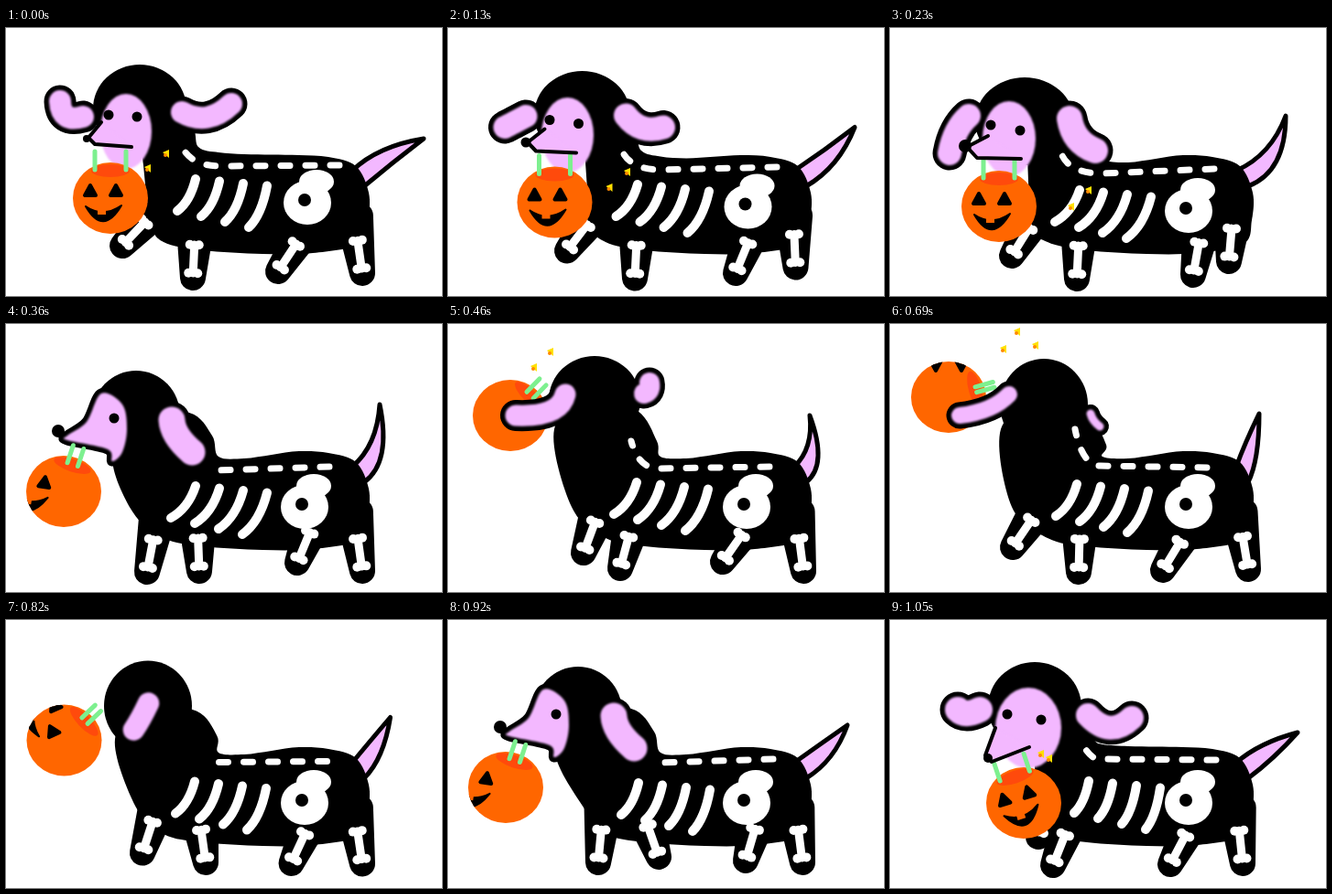
Animation of 476 by 293 pixels, one loop 1.15 s. Source, as an HTML page with a canvas:

```html
<!DOCTYPE html>
<html lang="en">
<head>
<meta charset="utf-8">
<title>Skeleton dachshund</title>
<style>
html, body { margin: 0; height: 100%; overflow: hidden; background: #fff; }
canvas { display: block; }
</style>
</head>
<body>
<canvas id="stage" width="476" height="293"></canvas>
<script>
const ctx = document.getElementById('stage').getContext('2d');
const PINK = '#f3b8ff', ORANGE = '#ff6600', RIM = '#ff4a0c', GREEN = '#7df08f';
const LOOP = 1150;

// hood: x, y, rx, ry          neck: chest, throat, nape, shoulder
// near, far: ear root, bend, tip, width      tail: bend, tip
// paws: front pair, hind pair    spine: rump, withers, neck    ribs: x, y, lean
// pail: x, y, tilt, handle spread, face dx, dy, angle
const base = { lift: 0, hip: [326, 200], ribs: [209, 173, -27], eyes: [], candy: [] };
const front = {
  ...base, lift: 9, hip: [329, 191], ribs: [209, 161, -20],
  hood: [146, 88, 51, 48], neck: [158, 212, 150, 150, 200, 105, 210, 130],
  near: [192, 92, 220, 108, 246, 83, 24], far: [84, 97, 60, 104, 59, 80, 24],
  cheek: [131, 113, 28, 41], eyes: [112, 95, 143, 97],
  muzzle: [104, 103, 90, 120, 97, 127, 137, 130], nose: [88, 121, 4],
  tail: [415, 138, 456, 121], paws: [127, 238, 204, 273, 297, 266, 389, 268],
  spine: [364, 150, 235, 151, 190, 124], pail: [114, 186, 0, 17, -8, 0, 0],
  candy: [155, 154, 175, 138]
};
const earsDown = {
  ...base,
  hood: [147, 102, 54, 48], neck: [155, 215, 150, 145, 198, 115, 212, 138],
  near: [196, 99, 200, 125, 224, 134, 28], far: [86, 96, 70, 110, 65, 137, 26],
  cheek: [130, 121, 29, 41], eyes: [110, 106, 142, 112],
  muzzle: [107, 118, 84, 130, 95, 142, 143, 143], nose: [82, 129, 7],
  tail: [425, 148, 432, 96], paws: [133, 249, 204, 274, 331, 270, 370, 255],
  spine: [354, 154, 232, 159, 187, 137], pail: [119, 195, 0, 17, -8, 0, 0],
  candy: [198, 196, 217, 178]
};
const profile = {
  ...base,
  hood: [142, 100, 48, 49], neck: [138, 205, 116, 145, 200, 97, 225, 122],
  near: [181, 105, 182, 122, 203, 140, 29],
  snout: [104, 76, 127, 88, 132, 115, 127, 140, 116, 150, 111, 137, 67, 127, 67, 122, 88, 107],
  eyes: [118, 103], nose: [57, 117, 7],
  tail: [414, 142, 408, 88], paws: [154, 271, 211, 270, 318, 261, 389, 270],
  spine: [353, 156, 231, 160], pail: [63, 183, .32, 6, -36, -4, .15]
};
const turned = {
  ...base, behind: 1, ribs: [208, 169, -25],
  hood: [160, 83, 50, 48], neck: [135, 200, 116, 115, 207, 95, 228, 128],
  near: [128, 77, 122, 102, 74, 100, 23], far: [214, 76, 222, 74, 220, 64, 22],
  tail: [408, 145, 395, 100], paws: [148, 250, 188, 267, 300, 260, 388, 270],
  spine: [351, 156, 230, 158, 200, 128], pail: [68, 100, .77, 5, -90, 0, 0],
  candy: [94, 48, 112, 31]
};
const thrown = {
  ...base, behind: 1, ribs: [206, 171, -23],
  hood: [168, 88, 48, 50], neck: [133, 200, 121, 115, 216, 102, 236, 132],
  near: [130, 77, 112, 96, 76, 100, 18], far: [219, 98, 221, 106, 229, 112, 9],
  tail: [396, 140, 403, 98], paws: [134, 244, 206, 271, 298, 269, 391, 268],
  spine: [346, 157, 230, 155, 202, 115], pail: [64, 80, 1.3, 3, 0, -43, Math.PI],
  candy: [124, 28, 139, 9, 159, 24]
};
const strut = {
  ...profile, ribs: [210, 174, -19],
  neck: [150, 208, 117, 145, 200, 97, 225, 122],
  tail: [415, 145, 436, 115], paws: [164, 265, 230, 259, 325, 263, 387, 265],
  spine: [355, 152, 232, 156]
};
const earsOut = {
  ...base, lift: 9, ribs: [219, 172, -16],
  hood: [158, 95, 51, 49], neck: [163, 212, 158, 160, 207, 105, 222, 130],
  near: [216, 104, 240, 130, 264, 107, 26], far: [98, 98, 82, 106, 74, 98, 28],
  cheek: [151, 118, 36, 44], eyes: [128, 103, 165, 109],
  muzzle: [115, 118, 104, 148, 111, 155, 152, 139], nose: [107, 151, 5],
  tail: [412, 143, 445, 123], paws: [162, 237, 178, 268, 306, 267, 385, 266],
  spine: [356, 153, 228, 152, 212, 139], pail: [146, 200, -.32, 17, -6, 0, -.3],
  candy: [165, 147, 174, 152]
};

// Halfway between two poses; parts found in only one of them drop out.
function between(a, b) {
  if (typeof a === 'number') return (a + b) / 2;
  if (Array.isArray(a)) return a.slice(0, b.length).map((v, i) => between(v, b[i]));
  const shared = Object.keys(a).filter(k => k in b);
  return Object.fromEntries(shared.map(k => [k, between(a[k], b[k])]));
}
const timeline = [
  [0, front], [130, between(front, earsDown)], [230, earsDown], [360, profile], [460, turned],
  [590, between(turned, thrown)], [690, thrown], [820, between(thrown, strut)],
  [920, strut], [1050, earsOut]
];

function chunks(list, size, draw) {
  for (let i = 0; i < list.length; i += size) draw(...list.slice(i, i + size));
}

function stroke(color, width, path) {
  ctx.strokeStyle = color;
  ctx.lineWidth = width;
  ctx.stroke(path);
}

function fill(color, path) {
  ctx.fillStyle = color;
  ctx.fill(path);
}

function soften(draw) {
  ctx.filter = 'blur(1px)';
  draw();
  ctx.filter = 'none';
}

function lines(p) {
  const path = new Path2D();
  chunks(p, 2, (x, y) => path.lineTo(x, y));
  return path;
}

function bend(x1, y1, cx, cy, x2, y2) {
  const path = new Path2D();
  path.moveTo(x1, y1);
  path.quadraticCurveTo(cx, cy, x2, y2);
  return path;
}

// Closed Catmull-Rom curve through the points.
function blob(p) {
  const n = p.length, at = i => p[(i + n) % n];
  const path = new Path2D();
  path.moveTo(p[0], p[1]);
  for (let i = 0; i < n; i += 2) {
    const c = [0, 1].map(k => at(i + k) + (at(i + 2 + k) - at(i - 2 + k)) / 6);
    const d = [0, 1].map(k => at(i + 2 + k) - (at(i + 4 + k) - at(i + k)) / 6);
    path.bezierCurveTo(...c, ...d, at(i + 2), at(i + 3));
  }
  return path;
}

function oval(color, x, y, rx, ry = rx, turn = 0) {
  const path = new Path2D();
  path.ellipse(x, y, rx, ry, turn, 0, 7);
  fill(color, path);
}

function torso({ neck, hood, lift }) {
  const [chestX, chestY, throatX, throatY, ...nape] = neck;
  fill('#000', blob([
    232, 145 - lift, 260, 147 - lift, 290, 143 - lift / 2, 320, 139, 352, 141, 382, 151,
    396, 180, 395, 210, 386, 236, 335, 246, 280, 247, 215, 243, 172, 234,
    chestX, chestY, throatX, throatY, hood[0], hood[1], ...nape
  ]));
}

function tail([bx, by, tx, ty]) {
  const path = bend(378, 156, bx - 9, by - 9, tx, ty);
  path.quadraticCurveTo(bx + 7, by + 9, 391, 173);
  soften(() => fill(PINK, path));
  stroke('#000', 5, path);
}

function ear([x, y, cx, cy, tx, ty, width]) {
  const path = bend(x, y, cx, cy, tx, ty);
  stroke('#000', width + 11, path);
  soften(() => stroke(PINK, width, path));
}

function bone(x1, y1, x2, y2) {
  const a = Math.atan2(y2 - y1, x2 - x1), dx = 5 * Math.sin(a), dy = 5 * Math.cos(a);
  stroke('#fff', 9, lines([x1, y1, x2, y2]));
  for (const [x, y] of [[x1, y1], [x2, y2]]) {
    oval('#fff', x + dx, y - dy, 5);
    oval('#fff', x - dx, y + dy, 5);
  }
}

function legs(paws) {
  const hips = [172, 205, 208, 215, 345, 215, 376, 205];
  const set = [0, 2, 4, 6].map(i => {
    const [x, y] = paws.slice(i, i + 2);
    return { x, y, hx: hips[i] + .3 * (x - hips[i]), hy: hips[i + 1] };
  });
  for (const { x, y, hx, hy } of set) {
    const path = lines([hx - 7, hy, hx + 7, hy, x, y]);
    path.closePath();
    fill('#000', path);
    stroke('#000', 28, path);
  }
  for (const { x, y, hx, hy } of set) {
    const size = Math.hypot(x - hx, y - hy), ux = (x - hx) / size, uy = (y - hy) / size;
    bone(x - 36 * ux, y - 36 * uy, x - 5 * ux, y - 5 * uy);
  }
}

function skeleton({ ribs: [x, y, lean], spine, hip: [hx, hy] }) {
  for (let i = 0; i < 4; i++) {
    const top = x - 2 + 26 * i, high = y + 4 + 2.5 * i, drop = 35 + 3.5 * i;
    stroke('#fff', 10, bend(top, high, top + lean * .3, high + drop * .7, top + lean, high + drop));
  }
  const [rx, ry, wx, wy, nx, ny] = spine;
  const path = lines([rx, ry, wx, wy]);
  if (nx) path.quadraticCurveTo(nx + 8, wy, nx, ny);
  ctx.setLineDash([10, 17]);
  stroke('#fff', 7, path);
  ctx.setLineDash([]);
  oval('#fff', hx, hy, 26, 24);
  oval('#fff', hx + 10, hy - 23, 19, 13);
  oval('#000', hx - 3, hy - 3, 7);
}

function pail([x, y, tilt, spread, dx, dy, angle]) {
  const ball = new Path2D();
  ball.ellipse(x, y, 41, 39, 0, 0, 7);
  fill(ORANGE, ball);

  ctx.save();
  ctx.clip(ball);
  ctx.translate(x + dx, y + dy);
  ctx.rotate(angle);
  for (const side of [-14, 14]) {
    const eye = lines([side, -14, side - 6, -3, side + 6, -3]);
    eye.closePath();
    fill('#000', eye);
    stroke('#000', 4, eye);
  }
  const grin = bend(-19, 9, 0, 22, 20, 8);
  grin.quadraticCurveTo(0, 42, -19, 9);
  fill('#000', grin);
  stroke('#000', 2, grin);
  ctx.fillStyle = ORANGE;
  ctx.fillRect(-6, 12, 9, 6);
  ctx.restore();

  ctx.save();
  ctx.translate(x, y);
  ctx.rotate(tilt);
  oval(RIM, 0, -30, 21, 7);
  for (const side of [-spread, spread]) {
    stroke(GREEN, 5, lines([side, -31, side, -51]));
  }
  ctx.restore();
}

function face({ cheek, muzzle, snout, nose, eyes }) {
  soften(() => {
    if (cheek) oval(PINK, ...cheek);
    if (muzzle) fill(PINK, lines(muzzle));
  });
  if (snout) {
    stroke('#000', 11, blob(snout));
    soften(() => fill(PINK, blob(snout)));
  }
  if (nose) oval('#000', ...nose);
  chunks(eyes, 2, (x, y) => oval('#000', x, y, 5.5));
}

function candyCorn(x, y) {
  fill('#ffe100', lines([x - 4, y - 2, x + 3, y - 5, x + 3, y + 4]));
  oval('#ff8a00', x - 1, y + 1, 2);
}

function drawDog(p) {
  ctx.clearRect(0, 0, 476, 293);
  if (p.behind) pail(p.pail);
  tail(p.tail);
  torso(p);
  oval('#000', ...p.hood);
  legs(p.paws);
  skeleton(p);
  if (p.far) ear(p.far);
  face(p);
  ear(p.near);
  if (!p.behind) pail(p.pail);
  if (p.muzzle) stroke('#000', 4, lines(p.muzzle));
  chunks(p.candy, 2, candyCorn);
}

ctx.lineCap = ctx.lineJoin = 'round';
const start = performance.now();
function tick() {
  const t = (performance.now() - start) % LOOP;
  drawDog(timeline.findLast(([from]) => from <= t)[1]);
  requestAnimationFrame(tick);
}
tick();
</script>
</body>
</html>
```
